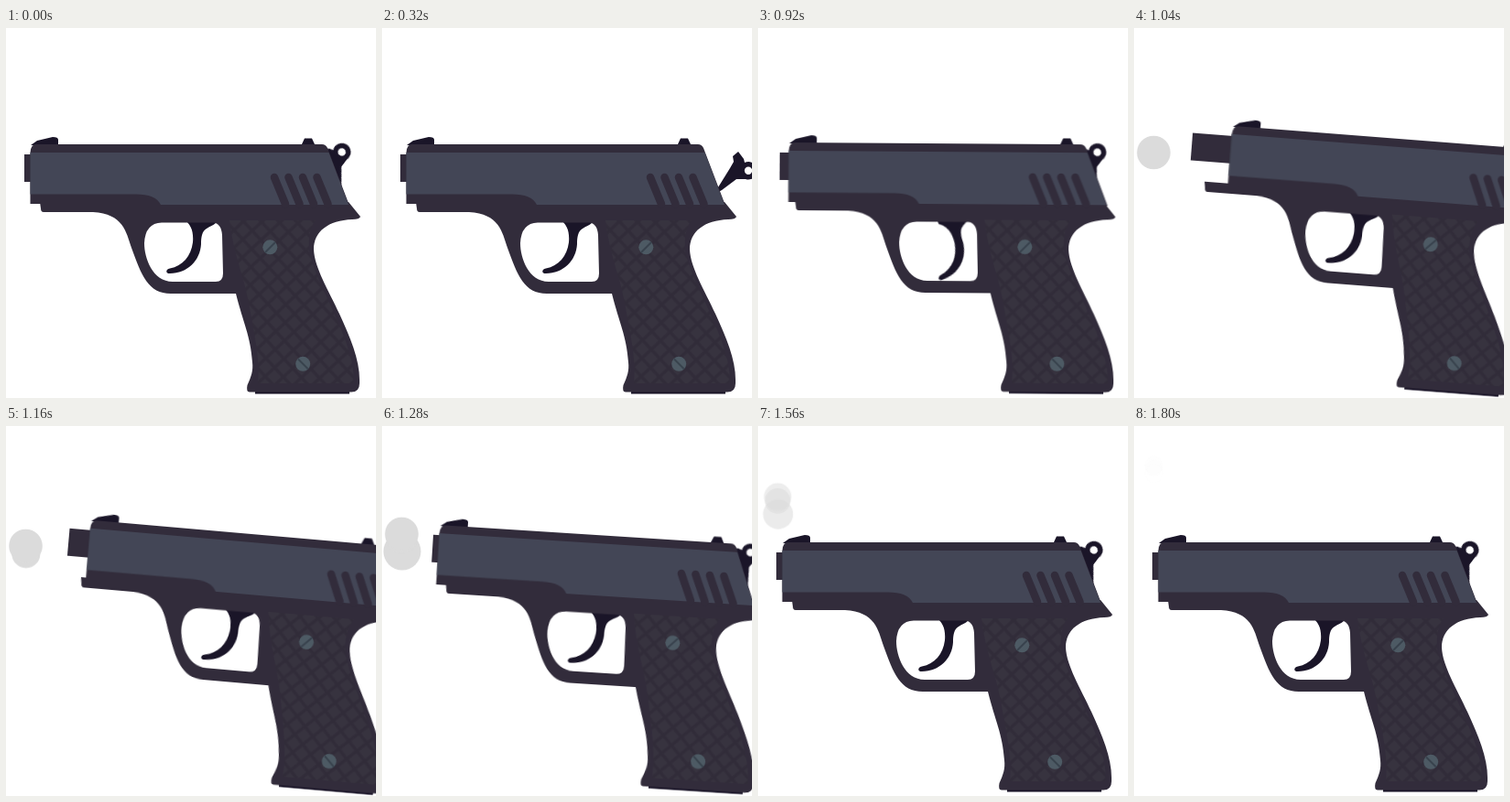
Recreate the animation shown at these times as an HTML page. Size 404 by 404 pixels, loop 1920 ms.

```html
<!DOCTYPE html>
<html lang="en">
<head>
<meta charset="utf-8">
<title>Pistol</title>
<style>
  html, body { margin: 0; width: 100%; height: 100%; overflow: hidden; background: #fff; }
  svg { display: block; width: 100vw; height: 100vh; }
  .dark { fill: #322c3b; }
  .ink { fill: #1a1528; }
  .steel { fill: #434656; }
  .slots { stroke: #322c3b; stroke-width: 8.5; stroke-linecap: round; }
  .screw circle { fill: #4d5a64; }
  .screw path { stroke: #38424d; stroke-width: 2; }
  #smoke circle { fill: #dbdbdb; opacity: 0; }
  #gun { transform-origin: 288px 239px; }
  #hammer { transform-origin: 363px 179px; }
  #trigger { transform-origin: 212px 212px; }
</style>
</head>
<body>
<svg viewBox="0 0 404 404">
  <defs>
    <pattern id="grid" width="14" height="14" patternUnits="userSpaceOnUse" patternTransform="translate(288 239) rotate(47)">
      <rect width="14" height="14" fill="#37333f"/>
      <path d="M0 2H14M2 0V14" stroke="#312c39" stroke-width="3.4"/>
    </pattern>
  </defs>

  <g id="smoke">
    <circle id="low" cx="22" r="20.5"/>
    <circle id="mid" cx="21.5" r="17"/>
    <circle id="top" cx="21.5" r="18.3"/>
  </g>

  <g id="gun">
    <g id="hammer" class="ink">
      <path fill-rule="evenodd" d="M362 182L380 153L384 146L383 140L389 135L395 143L396 147
        A9.700 9.700 0 1 1 397 165L387 165L371 177ZM404.200 155.800a4.200 4.200 0 1 0 -8.400 0a4.200 4.200 0 1 0 8.400 0Z"/>
    </g>
    <path id="trigger" class="ink" d="M194 209C202 214 205 222 204 234C202 249 193 260 179 262.500
      C174 263.500 174 268 179 268C198 268 212 254 213 236C213 228 214 222 219 219C223 216 226 216 229 213V205H194Z"/>
    <path class="dark" d="M20 138H90V168H20Z"/>
    <path class="ink" d="M272 395H375V399.500H272Z"/>
    <path class="dark" fill-rule="evenodd" d="M37 190H374L387 206Q386 209 378 209C352 210 336 222 336 242
      C337 262 352 286 364 312C376 338 386 362 386 384V388Q386 397.500 377 397.500H266Q262 397.500 263.500 390
      C268 380 270 374 269 365C267 336 259 322 251 290H180C155 290 148 270 137 240C131 222 128 203 95 201H41Q38 201 38 197Z
      M170 212.500Q152 213 151 235C151 251 160 277 182 277H229Q237 277 237 268L236 226Q235 213 226 212.500Z"/>
    <path fill="url(#grid)" d="M244 210H338C331 220 329 234 332 248C338 270 351 294 362 320
      C373 345 380 366 380 388H275C278 365 272 338 265 300C260 272 248 245 244 210Z"/>
    <g class="screw">
      <circle cx="288.300" cy="239.300" r="8"/><path d="M283 245L294 234"/>
      <circle cx="324.200" cy="366.800" r="8"/><path d="M319 361.500L330 372.500"/>
    </g>
    <g id="slide">
      <path class="ink" d="M27 128L34 123L51 119Q57 119 57 122V128ZM322.500 128L326 120.500H334L337.500 128Z"/>
      <path class="dark" d="M26.500 136Q27 127 33 127H345Q349 127 351 131L375 194H38V192H26.500Z"/>
      <path class="steel" d="M26.500 136H352.500L374 193H169C165 185 156 181.500 142 181.500H26.500Z"/>
      <path class="slots" d="M293 163L305 192M308.500 163L320.500 192M324 163L336 192M339.500 163L351.500 192"/>
    </g>
  </g>
</svg>
<script>
const LOOP = 1920;

// Each step: [time in ms, transform, opacity, easing to the next step]
function play(id, steps) {
  const first = steps[0], last = steps[steps.length - 1];
  const all = [[0, ...first.slice(1, 3)], ...steps, [LOOP, ...last.slice(1, 3)]];
  const frames = all.map(([ms, transform, opacity = 1, easing = 'linear']) =>
    ({ offset: ms / LOOP, transform, opacity, easing }));
  const anim = document.getElementById(id).animate(frames, { duration: LOOP, iterations: Infinity });
  anim.startTime = document.timeline.currentTime;
}

const turn = deg => `rotate(${deg}deg)`;
const kick = k => `translate(${40 * k}px, ${-3.4 * k}px) rotate(${5 * k}deg)`;
const shift = x => `translate(${x}px, 0px)`;
const puff = (y, size = 1) => `translate(${21.5 * (1 - size)}px, ${y}px) scale(${size})`;
const smooth = 'ease-in-out';

play('hammer', [
  [0, turn(-53), 1, smooth], [320, turn(0)],
  [840, turn(0), 1, 'ease-in'], [920, turn(-53)]
]);
play('trigger', [
  [720, turn(0)], [840, turn(-20)],
  [900, turn(-20), 1, smooth], [1020, turn(0)]
]);
play('gun', [
  [880, kick(0), 1, smooth], [1090, kick(1)],
  [1140, kick(1), 1, smooth], [1530, kick(0)]
]);
play('slide', [
  [880, shift(0), 1, smooth], [1085, shift(40), 1, smooth], [1220, shift(0)]
]);

play('top', [
  [920, puff(138, 0)], [1040, puff(136)], [1160, puff(131)],
  [1280, puff(118)], [1400, puff(100.5), .8], [1800, puff(43, .55), .04]
]);
play('mid', [
  [1080, puff(138, 0)], [1200, puff(133)],
  [1280, puff(123)], [1400, puff(106), .85], [1800, puff(46, .55), .04]
]);
play('low', [
  [1040, puff(138, 0)], [1200, puff(140)],
  [1280, puff(137)], [1400, puff(126), .93], [1800, puff(52, .5), .02]
]);
</script>
</body>
</html>
```
